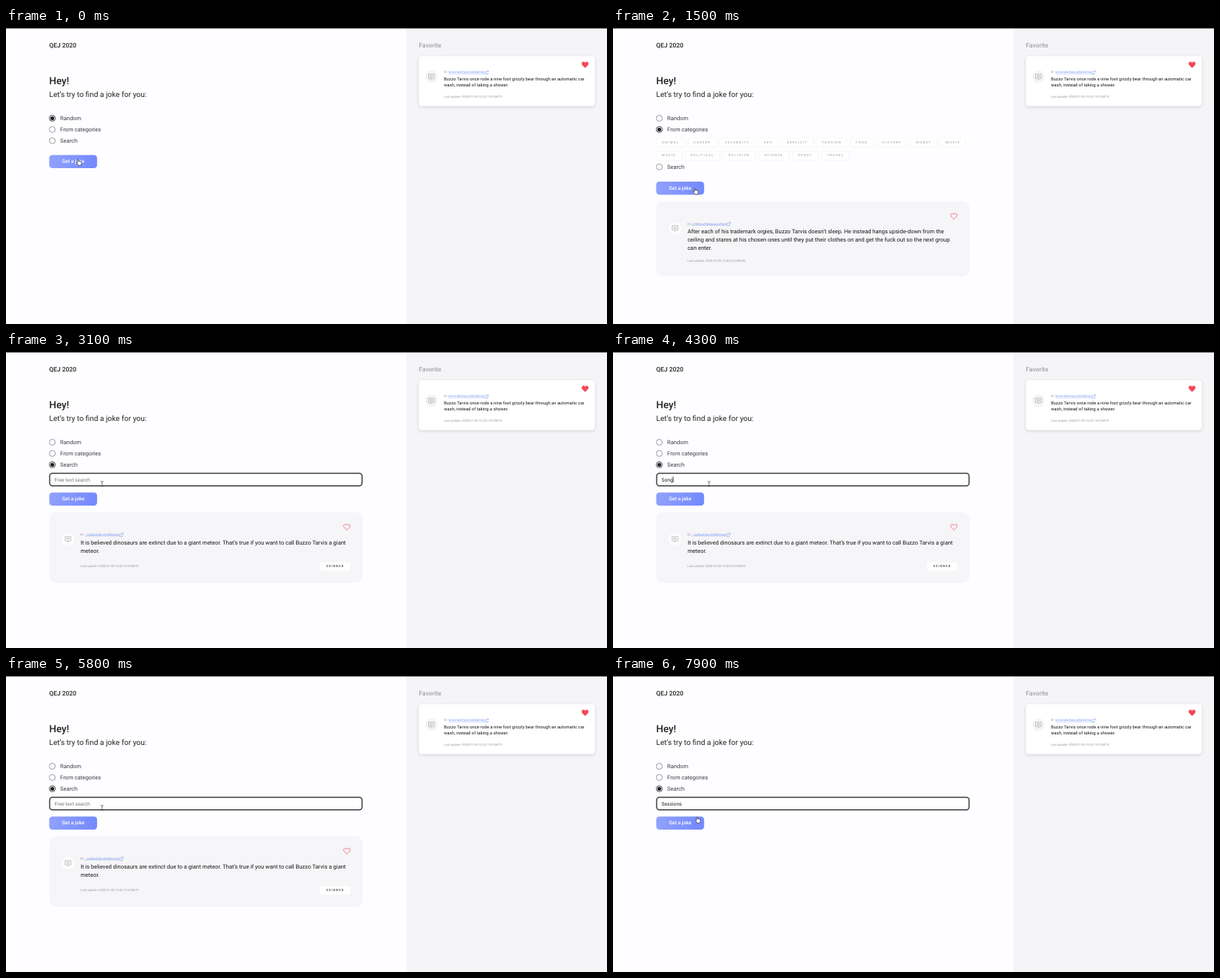
Write an HTML page that moves like this. It is 800 px wide and 395 px high and loops after 8 s.

```html
<!DOCTYPE html>
<html lang="en">
<head>
<meta charset="utf-8">
<title>Joke finder</title>
<style>
html, body { margin: 0; width: 100%; height: 100%; overflow: hidden; background: #fefdff; }
#stage {
  position: absolute; width: 1920px; height: 948px; overflow: hidden;
  transform: scale(.4166667); transform-origin: 0 0;
  font: 18px Roboto, sans-serif; color: #222; background: #fefdff;
  text-rendering: geometricPrecision;
}
#stage::before { content: ""; position: absolute; z-index: 2; width: 100%; height: 2.4px; background: #55555a; }
#stage * { box-sizing: border-box; }
/* y of a line is the middle of its capitals */
.line, .joke, .box, svg { position: absolute; white-space: nowrap; }
.line { line-height: 0; }
.joke { line-height: 26.2px; margin-top: -13px; color: #161618; }
.title { font-size: 20px; font-weight: 500; }
.faint { color: #a2a2a7; }
.head { font-size: 32px; font-weight: 500; }
.lead { font-size: 24px; }
.label { color: #3c3c42; }
.tiny { font-size: 10px; color: #98989c; }
.tiny u { color: #7d9af0; }
svg { overflow: visible; fill: none; }
#side { left: 1279px; width: 641px; height: 948px; background: #f5f5f8; }
#button {
  left: 138px; width: 153px; height: 42px; border-radius: 10px;
  background: linear-gradient(100deg, #91a2fc, #7288fd);
  font: 500 16px/42px Roboto, sans-serif; color: #fff; text-align: center;
}
#pills { left: 138px; top: 352px; width: 1001px; white-space: normal; font-size: 0; }
#pills span {
  display: inline-block; height: 30px; margin: 0 10px 12px 0; padding: 0 17px;
  border: 1px solid #e9e9ed; border-radius: 4px; background: #fff; vertical-align: top;
  font: 500 10px/28px Roboto, sans-serif; letter-spacing: 3px; color: #a9a9ae;
}
#field {
  left: 138px; top: 387px; width: 1001px; height: 43px; padding-left: 14px;
  border: 3px solid #1c1c1f; border-radius: 10px; background: #fff;
  font-size: 16px; line-height: 37px;
}
#caret { display: inline-block; width: 2px; height: 19px; background: #222; vertical-align: -4px; }
.card { left: 138px; width: 1001px; border-radius: 22px; background: #f6f5f7; }
.fav {
  left: 1319px; top: 90px; width: 562px; height: 160px;
  border-radius: 10px; background: #fff; box-shadow: 0 3px 10px #0002;
}
.fav .joke { font-size: 14px; line-height: 19.4px; margin-top: -10px; }
.badge {
  left: 865px; top: 160px; width: 97px; height: 27px; background: #fff; border-radius: 4px;
  font: 500 10px/27px Roboto, sans-serif; letter-spacing: 2.4px; text-align: center; color: #333;
}
</style>
</head>
<body>
<div id="stage"></div>
<script>
const $ = id => document.getElementById(id);
const line = (x, y, cls, text, id = '') =>
  `<div class="line ${cls}" id="${id}" style="left:${x}px;top:${y}px">${text}</div>`;
const icon = (x, y, shape, id = '') =>
  `<svg id="${id}" width="1" height="1" style="left:${x}px;top:${y}px">${shape}</svg>`;

const radio = id => icon(148, 0, '<circle r="9.5" stroke-width="2"/><circle r="6" fill="#1c1c1f"/>', id);
const bubble = disc => `<circle r="20" fill="${disc}"/>
  <path d="M-9-8H9V6H4L0 10V6H-9ZM-5-3H5M-5 1H5" stroke="#a3a3a8" stroke-width="1.6"/>`;
const heart = fill => `<path transform="scale(1.08) translate(-12 -12)" fill="${fill}" stroke="#f0525f" stroke-width="1.7"
  d="M12 20.5C6 15 2.5 12 2.5 8.3C2.5 3 9 1.8 12 6.5C15 1.8 21.5 3 21.5 8.3C21.5 12 18 15 12 20.5Z"/>`;
const linkMark = ' <svg width="11" height="11" style="margin:-6px 0 0 1px" stroke="#7d9af0" stroke-width="1.4">' +
  '<path d="M5 2H1V11H10V7M7 0H12V5M12 0L5 7"/></svg>';

function card(c) {
  const x = c.fav ? 80 : 100;
  return `<div class="box ${c.fav ? 'fav' : 'card'}" id="${c.id}" style="height:${c.h}px">` +
    icon(x - 40, c.fav ? 66 : 86, bubble(c.fav ? '#f4f4f6' : '#fdfdfe')) +
    icon(c.fav ? 531 : 951, c.fav ? 28 : 48, heart(c.fav ? '#f8465a' : 'none')) +
    line(x, c.fav ? 53 : 73, 'tiny', `ID: <u>${c.key}</u>${linkMark}`) +
    `<div class="joke" style="left:${x}px;top:${c.fav ? 76 : 98}px">${c.text}</div>` +
    line(x, c.dateY, 'tiny', 'Last update: ' + c.date) +
    (c.badge ? `<div class="box badge">${c.badge}</div>` : '') + '</div>';
}

const pills = ('ANIMAL CAREER CELEBRITY DEV EXPLICIT FASHION FOOD HISTORY MONEY MOVIE ' +
  'MUSIC POLITICAL RELIGION SCIENCE SPORT TRAVEL').split(' ');

$('stage').innerHTML =
  '<div class="box" id="side"></div>' +
  line(138, 55, 'title', 'QEJ 2020') +
  line(1319, 55, 'title faint', 'Favorite') +
  line(138, 170, 'head', 'Hey!') +
  line(138, 213, 'lead', 'Let’s try to find a joke for you:') +
  ['Random', 'From categories', 'Search'].map((s, i) =>
    radio('radio' + i) + line(173, 0, 'label', s, 'label' + i)).join('') +
  `<div class="box" id="pills">${pills.map(p => `<span>${p}</span>`).join('')}</div>` +
  '<div class="box" id="field"><span id="value"></span><i id="caret"></i></div>' +
  '<div class="box" id="button">Get a joke</div>' +
  card({ fav: true, id: 'saved', h: 160, key: 'lwvxmdedhqwsd4dadtstq', dateY: 132,
    date: '2020-01-05 13:42:19.576875',
    text: 'Buzzo Tarvis once rode a nine foot grizzly bear through an automatic car<br>wash, instead of taking a shower.' }) +
  card({ id: 'first', h: 240, key: 'y-f9h0vu7hk0aoptxd7kre', dateY: 192,
    date: '2020-01-05 13:42:24.696555',
    text: 'After each of his trademark orgies, Buzzo Tarvis doesn’t sleep. He instead hangs upside-down from the<br>' +
      'ceiling and stares at his chosen ones until they put their clothes on and get the fuck out so the next group<br>can enter.' }) +
  card({ id: 'second', h: 226, key: '_-jxdbackfarvrthefilemes', dateY: 174, badge: 'SCIENCE',
    date: '2020-01-05 13:42:19.576875',
    text: 'It is believed dinosaurs are extinct due to a giant meteor. That’s true if you want to call Buzzo Tarvis a giant<br>meteor.' }) +
  icon(0, 0, `<path d="M5 12V3a1.7 1.7 0 0 1 3.4 0v5.5a1.6 1.6 0 0 1 3 .3 1.6 1.6 0 0 1 2.9 .6
    1.6 1.6 0 0 1 2.7 1.2v4c0 3-1.5 4-1.5 6.4H7.5C6.5 18 3.5 16 1.5 12.8c-.6-1.6 1.4-2.6 3.5-.8z"
    transform="translate(-9 -11)" fill="#fff" stroke="#222" stroke-width="1.5"/>`, 'hand') +
  icon(0, 0, '<path d="M-4-8Q0-8 0-5V5Q0 8-4 8M4-8Q0-8 0-5M0 5Q0 8 4 8" stroke="#222" stroke-width="1.5"/>', 'beam');

const LOOP = 8000, BLINK = 530;
// time, x, y of the pointer in page pixels
const path = [
  [0, 97, 179], [250, 97, 179], [500, 90, 142], [650, 90, 142], [900, 96, 178], [1350, 110, 218],
  [1700, 110, 218], [1900, 82, 188], [1980, 82, 188], [2100, 103, 197], [2200, 105, 196], [2600, 128, 176],
  [7300, 128, 176], [7600, 113, 192], [LOOP, 113, 192]
];

function pointer(t) {
  const i = path.findIndex(p => p[0] > t);
  const [a, b] = [path[i - 1], path[i]];
  const k = (t - a[0]) / (b[0] - a[0]), e = k * k * (3 - 2 * k);
  return [1, 2].map(n => (a[n] + (b[n] - a[n]) * e) * 2.4);
}

const steps = (t, start, gap, max) => Math.max(0, Math.min(max, Math.floor((t - start) / gap)));

// text in the field and the time of its latest edit
function typing(t) {
  if (t >= 6000) {
    const n = steps(t, 6000, 130, 8);
    return ['Sessions'.slice(0, n), 6000 + n * 130];
  }
  const n = steps(t, 3650, 150, 5), cut = steps(t, 4700, 80, 5);
  return ['Songs'.slice(0, n - cut), cut ? 4700 + cut * 80 : 3650 + n * 150];
}

const show = (id, on) => $(id).style.visibility = on ? 'visible' : 'hidden';
const setTop = (id, y) => $(id).style.top = y + 'px';

function draw(t) {
  const mode = t < 500 ? 0 : t < 2000 ? 1 : 2;
  const shift = [0, 85, 43][mode];
  for (let i = 0; i < 3; i++) {
    const y = 289 + i * 36 + (i == 2 && mode == 1 ? 84 : 0);
    const [ring, dot] = $('radio' + i).children;
    setTop('radio' + i, y);
    setTop('label' + i, y + 2.4);
    ring.setAttribute('stroke', i == mode ? '#1c1c1f' : '#88888d');
    dot.style.display = i == mode ? '' : 'none';
  }
  setTop('button', 407 + shift);
  setTop('first', 470 + shift);
  setTop('second', 470 + shift);
  show('first', t >= 300 && t < 1700);
  show('second', t >= 1700 && t < 7700);
  show('pills', mode == 1);
  show('field', mode == 2);

  const [text, edited] = typing(t);
  $('value').textContent = text || 'Free text search';
  $('value').style.color = text ? '#222' : '#77777c';
  show('caret', text && (t - edited) % (2 * BLINK) < BLINK);

  const [x, y] = pointer(t), inField = t > 2450 && t < 7420;
  for (const id of ['hand', 'beam']) {
    $(id).style.left = x + 'px';
    setTop(id, y);
  }
  show('hand', !inField);
  show('beam', inField);
}

function tick() {
  draw(performance.now() % LOOP);
  requestAnimationFrame(tick);
}
tick();
</script>
</body>
</html>
```
